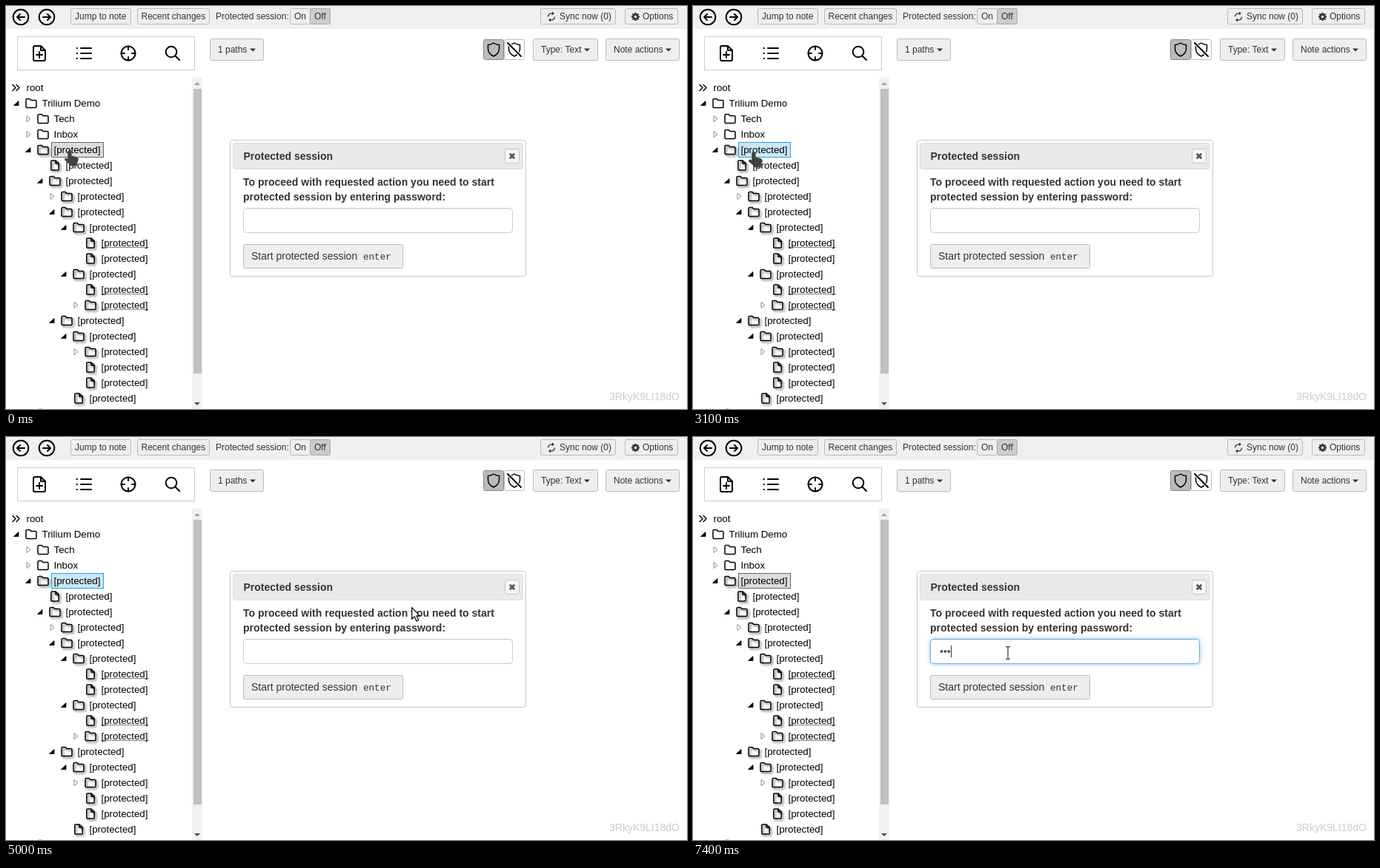
Animation, 919 px wide and 545 px high, one loop 8000 ms. Source, as an HTML page:

```html
<!DOCTYPE html>
<html lang="en">
<head>
<meta charset="utf-8">
<title>Protected session</title>
<style>
html, body { margin: 0; width: 919px; height: 545px; overflow: hidden; background: #fff; }
svg { display: block; font: 12px "Liberation Sans", Arial, sans-serif; fill: #333; }
text { white-space: pre; }
.tree text { font-size: 13.333px; fill: #000; }
.btn { fill: #eee; stroke: #bbb; }
.on { fill: #ccc; stroke: #aaa; }
.line { fill: none; stroke: #000; stroke-width: 2; stroke-linecap: round; stroke-linejoin: round; }
.thin { stroke-width: 1.5; }
.locked { filter: drop-shadow(2px 2px 1.5px rgba(0,0,0,.6)); }
.bold { font-size: 14px; font-weight: bold; }
.focus { stroke: #66afe9; filter: drop-shadow(0 0 3px rgba(102,175,233,.7)); }
</style>
</head>
<body>
<svg id="stage" width="919" height="545" viewBox="0 0 919 545"></svg>
<script>
const LOOP = 8000;
const stage = document.getElementById('stage');

const box = (x, y, x2, y2, cls, r = 2) =>
  `<rect x="${x + .5}" y="${y + .5}" width="${x2 - x - 1}" height="${y2 - y - 1}" rx="${r}" class="${cls}"/>`;
const text = (x, y, str, attrs = '') => `<text x="${x}" y="${y}" ${attrs}>${str}</text>`;
const at = (x, y, body, attrs = '') => `<g transform="translate(${x} ${y})" ${attrs}>${body}</g>`;
const line = (d, cls = '') => `<path d="${d}" class="line ${cls}"/>`;
const button = (x, y, x2, y2, label, tx, ty, cls = 'btn') => box(x, y, x2, y2, cls) + text(tx, ty, label);
const dropdown = (x, x2, label) =>
  button(x, 44, x2, 74, label, x + 11, 63) + `<path d="M${x2 - 19} 57.5h8l-4 4z"/>`;

// Icons, centred on 0,0
const SHIELD = 'M0-9C-3-7-5-6.5-7.5-6.5V-1C-7.5 4-4 7 0 9C4 7 7.5 4 7.5-1V-6.5C5-6.5 3-7 0-9Z';
const CIRCLE_ARROW = '<circle r="10.3" class="line"/>' + line('M5 0H-5M-1-4L-5 0L-1 4');
const FOLDER = line('M-7-4.5Q-7-6-5.5-6H-2L0-4H5.5Q7-4 7-2.5V4.5Q7 6 5.5 6H-5.5Q-7 6-7 4.5Z', 'thin');
const PAGE = line('M-5.2-5.2Q-5.2-6.5-4-6.5H1L5.2-2.5V5.2Q5.2 6.5 4 6.5H-4Q-5.2 6.5-5.2 5.2ZM1-6.5V-2.5H5.2', 'thin');
const OPEN = '<path d="M3-3V3H-3.5Z" fill="#000" stroke="#000" stroke-width=".8"/>';
const CLOSED = '<path d="M-2-4L3 0L-2 4Z" fill="#fff" stroke="#888"/>';

function toolbar() {
  const gear = Array.from({ length: 8 }, (_, i) =>
    `<rect x="-1.2" y="-5.5" width="2.4" height="3" transform="rotate(${i * 45})"/>`).join('');
  return '<rect width="919" height="31" fill="#f0f0f0"/>'
    + at(20, 15, CIRCLE_ARROW) + at(55, 15, CIRCLE_ARROW.replace('<path', '<path transform="scale(-1 1)"'))
    + button(87, 3, 169, 25, 'Jump to note', 93, 18)
    + button(177, 3, 275, 25, 'Recent changes', 182.5, 18)
    + text(283, 18, 'Protected session:')
    + button(383, 3, 411, 25, 'On', 389, 18)
    + button(410, 3, 438, 25, 'Off', 416, 18, 'on')
    + button(721, 3, 823, 25, 'Sync now (0)', 747, 18)
    + at(736, 14.5, '<path d="M-4.5 0A4.5 4.5 0 0 1-1-4.4H2M4.5 0A4.5 4.5 0 0 1 1 4.4H-2" fill="none" stroke="#333" stroke-width="1.3"/><path d="M1-7L4-4.4L1-2ZM-1 7L-4 4.4L-1 2Z"/>')
    + button(835, 3, 907, 25, 'Options', 859, 18)
    + at(849.5, 14.5, gear + '<circle r="2.9" fill="none" stroke="#333" stroke-width="2.2"/>');
}

function noteBar() {
  return box(15, 41, 255, 87, 'frame" fill="none" stroke="#ccc', 0)
    + at(45, 64, line('M-8-8Q-8-10-6-10H2L8-4V8Q8 10 6 10H-6Q-8 10-8 8ZM2-10V-4H8M-4 2H4M0-2V6'))
    + at(105, 64, line('M-4-7H10M-4 0H10M-4 7H10M-9.5-7H-9M-9.5 0H-9M-9.5 7H-9'))
    + at(165, 64, '<circle r="9.5" class="line"/>' + line('M0-9.5V-5M0 9.5V5M-9.5 0H-5M9.5 0H5'))
    + at(225, 64, '<circle cx="-2" cy="-2" r="7.3" class="line"/>' + line('M3.5 3.5L9 9'))
    + dropdown(275, 348, '1 paths') + dropdown(711, 799, 'Type: Text') + dropdown(809, 909, 'Note actions')
    + box(672, 45, 700, 73, 'shield" fill="#fff" stroke="#bbb')
    + box(644, 45, 672, 73, 'shield" fill="#bbb" stroke="#888')
    + at(658, 59, line(SHIELD, 'thin'))
    + at(686, 59, line(SHIELD, 'thin') + '<path d="M-9-9L9 9" stroke="#fff" stroke-width="4"/>' + line('M-9-9L9 9'));
}

// Rows: depth, then + open, - closed, . leaf; * marks a cloned note
const ROWS = '1+ 2- 2- 2+ 3. 3+ 4- 4+ 5+ 6.* 6. 5+ 6.* 6-* 4+ 5+ 6- 6. 6. 5. 2-'.split(' ');
const NAMES = ['Trilium Demo', 'Tech', 'Inbox'];

function treeRow(row, i) {
  const [depth, kind, clone] = row;
  const x = 16 * depth - 2, y = 131 + 21 * i;
  const arrow = { '+': OPEN, '-': CLOSED, '.': '' }[kind];
  return at(x, y + .5, arrow)
    + at(x + 20, y + .5, kind === '.' ? PAGE : FOLDER, i > 2 ? 'class="locked"' : '')
    + text(x + 34.5, y + 5, NAMES[i] || '[protected]')
    + (clone ? `<path d="M${x + 35} ${y + 6.5}h63" stroke="#000" stroke-dasharray="1 1"/>` : '');
}

function tree() {
  return '<g class="tree">' + box(61, 184, 132, 205, '" id="selection', 0)
    + line('M9 106.5L13 110.5L9 114.5M14 106.5L18 110.5L14 114.5', 'thin')
    + text(27.5, 115, 'root') + ROWS.map(treeRow).join('') + '</g>'
    + '<rect x="251" y="97" width="14" height="448" fill="#f1f1f1"/>'
    + '<rect x="253" y="112" width="11" height="385" fill="#c1c1c1"/>'
    + '<path d="M254 107h8l-4-4z" fill="#a3a3a3"/><path d="M254 536h8l-4 4z" fill="#505050"/>';
}

function dialog() {
  return box(302, 181, 702, 366, 'dialog" fill="#fff" stroke="#c5c5c5', 3)
    + box(306, 185, 698, 221, 'head" fill="#e9e9e9" stroke="#ddd', 3)
    + text(320.5, 208, 'Protected session', 'class="bold"')
    + box(673, 193, 693, 213, 'close" fill="#f6f6f6" stroke="#c5c5c5', 3)
    + at(683, 203, '<path d="M-3.2-3.2L3.2 3.2M3.2-3.2L-3.2 3.2" stroke="#555" stroke-width="2.8"/>')
    + text(320, 243, 'To proceed with requested action you need to start', 'class="bold"')
    + text(320, 263, 'protected session by entering password:', 'class="bold"')
    + box(320, 273, 684, 307, '" id="field" fill="#fff" stroke="#ccc', 4)
    + '<path d="M323 274.5H681" stroke="#f0f0f0"/>'
    + text(333, 295, '', 'id="dots" font-size="14" fill="#555"')
    + '<path id="caret" d="M0 282V298" stroke="#333"/>'
    + button(320, 322, 536, 355, '', 0, 0)
    + text(331, 343, 'Start protected session', 'font-size="14"')
    + text(482, 343, 'enter', 'font-size="12.6" font-family="Liberation Mono, monospace"')
    + text(814, 533, '3RkyK9LI18dO', 'font-size="14" fill="#ccc"');
}

const CURSORS = {
  hand: '<path d="M-2.5 1Q-2-.8 0-.8T2.3 1V6.5L9.5 8.5Q12 9.5 11.5 12L10 16V20H-.5V17.5L-6.5 12.5Q-7.5 10-5 9.7L-2.5 11Z" fill="#404040" stroke="#555" stroke-width=".6"/>',
  arrow: '<path d="M.7.7V16L4.3 12.8L7 19L9.8 17.8L7.1 11.8H11.5Z" fill="#fff" stroke="#000" stroke-width="1.2"/>',
  move: [0, 90, 180, 270].map(a => `<path d="M0-12L3.5-7H-3.5Z" fill="#404040" stroke="#fff" stroke-width=".5" transform="rotate(${a})"/>`).join('')
    + '<circle r="3.4" cy=".5" fill="#d8ab55"/>',
  beam: '<path d="M-3-8.5H-1L0-7.5L1-8.5H3M0-7.5V7.5M-3 8.5H-1L0 7.5L1 8.5H3" fill="none" stroke="#fff" stroke-width="3"/><path d="M-3-8.5H-1L0-7.5L1-8.5H3M0-7.5V7.5M-3 8.5H-1L0 7.5L1 8.5H3" fill="none" stroke="#333" stroke-width="1.2"/>'
};

stage.innerHTML = toolbar() + noteBar() + tree() + dialog()
  + Object.entries(CURSORS).map(([id, shape]) => `<g id="${id}">${shape}</g>`).join('');
const el = id => document.getElementById(id);

// Pointer route: time, x, y
const ROUTE = [
  [0, 86, 196], [1800, 86, 196], [2300, 122, 199], [2500, 122, 199], [2800, 212, 215],
  [3100, 82, 198], [3200, 81, 200], [3400, 82, 205], [3600, 230, 225], [3700, 315, 220],
  [3800, 315, 220], [3900, 328, 211], [4100, 340, 208], [4500, 340, 208], [4800, 470, 219],
  [5000, 547, 230], [5200, 562, 247], [5400, 523, 263], [5800, 425, 291.5], [LOOP, 425, 291.5]
];

function pointerAt(t) {
  const i = ROUTE.findIndex(key => key[0] > t);
  const [t0, x0, y0] = ROUTE[i - 1], [t1, x1, y1] = ROUTE[i];
  const u = (t - t0) / (t1 - t0);
  return [Math.round(x0 + (x1 - x0) * u), Math.round(y0 + (y1 - y0) * u)];
}

function cursorAt(x, y, t) {
  const inside = (l, top, r, b) => x >= l && x < r && y >= top && y < b;
  if (inside(61, 184, 132, 207)) return 'hand';
  if (inside(306, 185, 698, 221) && t >= 3900 && t < 4400) return 'move';
  return inside(320, 273, 684, 307) ? 'beam' : 'arrow';
}

function render(time) {
  const t = Math.floor(time % LOOP / 100) * 100;
  const [x, y] = pointerAt(t);
  const active = cursorAt(x, y, t);
  for (const id in CURSORS) {
    el(id).setAttribute('visibility', id === active ? 'visible' : 'hidden');
    el(id).setAttribute('transform', `translate(${x} ${y})`);
  }
  const treeFocused = t >= 1100 && t < 6100;
  el('selection').setAttribute('fill', treeFocused ? '#cbe8f6' : '#ddd');
  el('selection').setAttribute('stroke', treeFocused ? '#26a0da' : '#666');
  el('field').setAttribute('class', t >= 6200 ? 'focus' : '');

  const typed = [6900, 7100, 7400].filter(key => t >= key).length;
  el('dots').textContent = '•'.repeat(typed);
  el('caret').setAttribute('visibility', t >= 6100 ? 'visible' : 'hidden');
  el('caret').setAttribute('transform', `translate(${333.5 + 5 * typed} 0)`);
}

const start = performance.now();
function tick() {
  render(performance.now() - start);
  requestAnimationFrame(tick);
}
tick();
</script>
</body>
</html>
```
